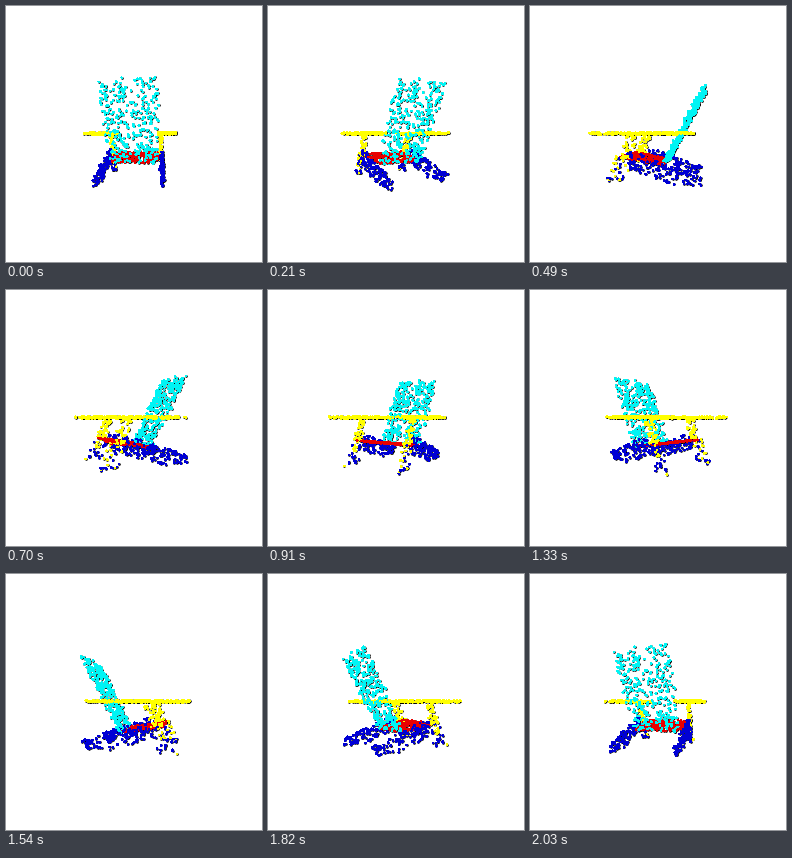
These frames come from a looping animation (256x256 px, 2.1 s). A matplotlib script:

```python
import numpy as np
import matplotlib.pyplot as plt
from matplotlib.animation import FuncAnimation

SIZE, DPI = 256, 100
FRAMES, STEP_MS = 30, 70
START = np.radians(-6.8)
EYE = 210  # camera distance in stage units
CYAN, YELLOW, RED, BLUE = "#00f4f4", "#ffff00", "#e80000", "#0000d4"

rng = np.random.default_rng(7)
clouds = []


def add(x, y, z, color):
    """Add points: x across, y up, z towards the backrest."""
    rgb = np.array([int(color[i:i + 2], 16) / 255 for i in (1, 3, 5)])
    clouds.append(np.column_stack([x, y, z, np.tile(rgb, (len(x), 1))]))


def mix(a, b, t):
    return a + (b - a) * t


def jitter(n, r):
    return rng.uniform(-r, r, n)


def backrest(n=330):
    t = rng.uniform(0, 1, n)
    x = rng.uniform(1.2, 24.5, n) * rng.choice([-1, 1], n)
    add(x, mix(-28, 44, t) + jitter(n, 0.8), mix(8, 46, t) + jitter(n, 1.5), CYAN)


def seat(n=200):
    t = rng.uniform(0, 1, n)
    add(jitter(n, 25), mix(-21, -27.5, t) + jitter(n, 0.5), mix(-31, 9, t), RED)


def arm(side, n=170):
    add(side * rng.uniform(24, 41, n), rng.uniform(-0.4, 1.5, n),
        rng.uniform(-54, 34, n), YELLOW)


def front_leg(side, n=62):
    t = rng.uniform(0, 1, n)
    x = side * 27 + jitter(n, 1.5)
    y = mix(-1, -43, t)
    z = mix(-18, -35, t) + jitter(n, 1) * mix(5, 9, t)
    blue = rng.uniform(0, 1, n) < np.clip((t - 0.4) * 1.3, 0, 1)
    for mask, color in ((~blue, YELLOW), (blue, BLUE)):
        add(x[mask], y[mask], z[mask], color)


def rail(side, n=115):
    t = rng.uniform(0, 1, n)
    top = mix(-14, -35, t)
    bottom = mix(-30, -43, np.minimum(2 * t, 1))
    add(side * 28 + jitter(n, 1.4), mix(top, bottom, rng.uniform(0, 1, n)),
        mix(-22, 43, t), BLUE)


backrest()
seat()
for side in (-1, 1):
    arm(side)
    front_leg(side)
    rail(side)
chair = np.vstack(clouds)
X, Y, Z = chair[:, :3].T
RGB = chair[:, 3:]


def project(angle):
    c, s = np.cos(angle), np.sin(angle)
    depth = Z * c - X * s
    scale = EYE / (EYE - depth)
    pos = np.column_stack([128 + (X * c + Z * s) * scale, 128 - Y * scale])
    order = np.argsort(depth)
    return pos[order], RGB[order]


fig = plt.figure(figsize=(SIZE / DPI, SIZE / DPI), dpi=DPI, facecolor="white")
ax = fig.add_axes([0, 0, 1, 1])
ax.set_xlim(0, SIZE)
ax.set_ylim(SIZE, 0)
ax.axis("off")


def dots(diameter, color):
    return ax.scatter(X, Y, s=(diameter * 72 / DPI) ** 2, c=color,
                      linewidths=0, antialiased=False, snap=False)


rims = dots(2.6, "black")
cores = dots(1.7, RGB)


def update(i):
    pos, rgb = project(START + 2 * np.pi * i / FRAMES)
    rims.set_offsets(pos)
    cores.set_offsets(pos)
    cores.set_facecolor(rgb)
    return rims, cores


anim = FuncAnimation(fig, update, frames=FRAMES, interval=STEP_MS,
                     repeat=True, repeat_delay=0)
plt.show()
```
